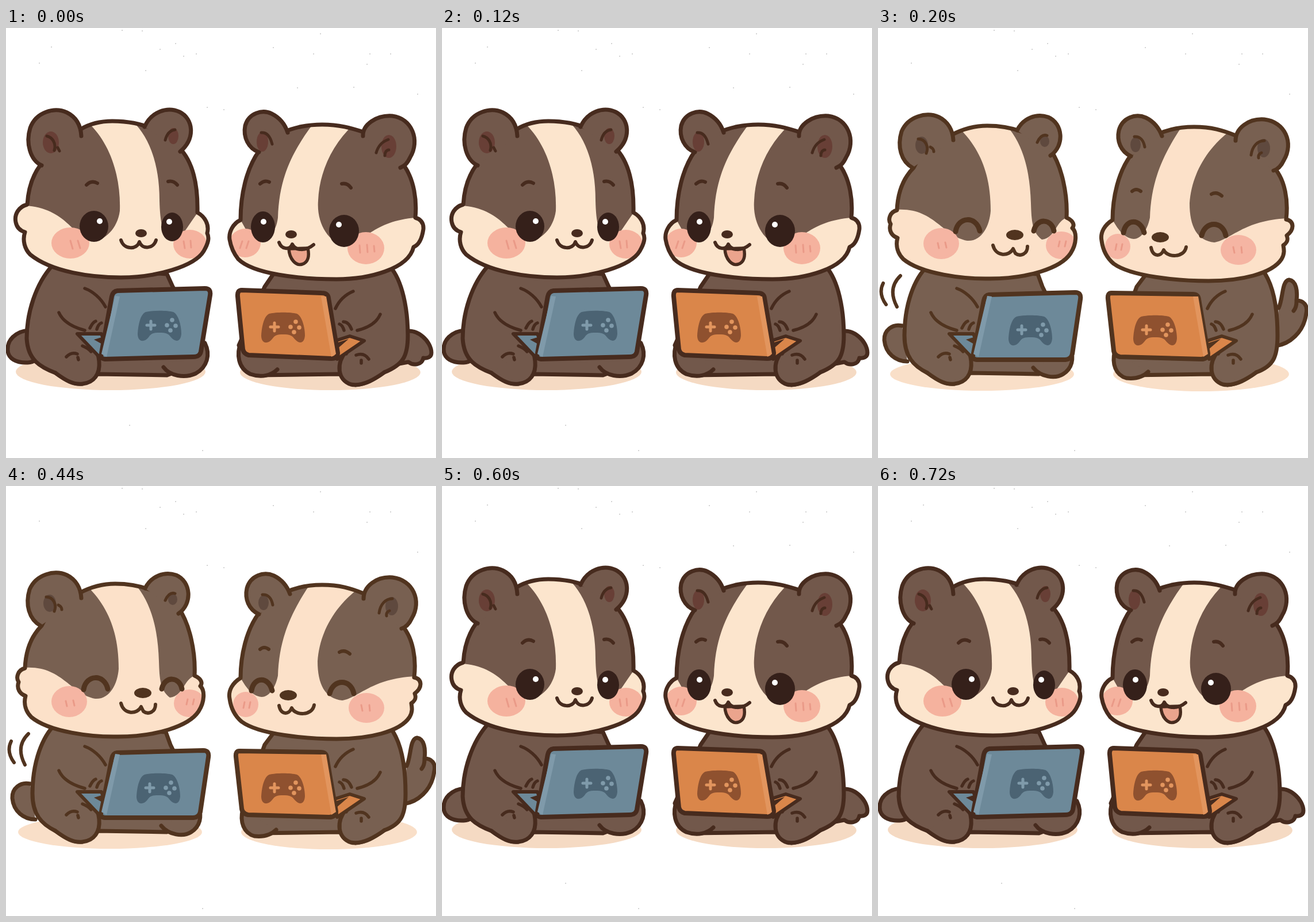
An HTML page for the animation above (800 ms loop, 748x748 px).

```html
<!DOCTYPE html>
<html>
<head>
<meta charset="utf-8">
<style>
html, body { margin: 0; width: 100%; height: 100%; overflow: hidden; background: #fff }
svg { display: block; width: 100vw; height: 100vh; stroke-linecap: round; stroke-linejoin: round }
</style>
</head>
<body>
<svg id="stage" viewBox="0 0 748 748"></svg>
<script>
const path = (d, fill = 'none', stroke = 'none', width = 7) =>
  `<path d="${d}" fill="${fill}" stroke="${stroke}" stroke-width="${width}"/>`;
const oval = ([x, y, rx, ry], fill, extra = '') =>
  `<ellipse cx="${x}" cy="${y}" rx="${rx}" ry="${ry}" fill="${fill}" ${extra}/>`;

const open = { fur: '#72584b', line: '#472b1e', cream: '#fce5cd', blush: '#f5b29e', ear: '#683f36', shade: '#f5dac3' };
const happy = { fur: '#786051', line: '#51341f', cream: '#fce1c9', blush: '#f5b5a3', ear: '#5f493e', shade: '#f9dfc8' };

// Parts each badger keeps in both poses
const left = {
  arm: 'M92 495C99 511 115 520 137 526M137 453C151 458 165 470 173 485M146 522C150 514 153 511 156 510M158 524C160 517 163 514 166 513',
  foot: 'M86 600C105 614 118 621 133 619C153 617 164 602 162 580C161 568 158 560 151 553',
  knee: 'M105 572Q114 563 124 567M125 573l1 4M133 553Q143 557 148 563',
  base: 'M124 532L166 532L173 550L165 575Z', notch: 'M153 542L173 536L169 551Z',
  device: ['#6d8999', '#7f9aaa', '#4b6373'], bevel: 'M190 466L166 567L175 572L198 467Z'
};
const right = {
  arm: 'M651 498C645 512 632 521 611 526M604 458C592 463 580 473 573 488M601 524C597 514 592 511 587 511M588 526C586 519 583 516 580 515',
  foot: 'M592 562C574 583 576 612 600 620C618 624 640 612 658 599',
  knee: 'M609 569Q623 564 631 576M618 578l0 5M600 558Q594 562 592 567',
  base: 'M623 544L598 536L570 545L576 576Z', notch: 'M571 549L596 541L574 560Z',
  device: ['#da864a', '#e2955e', '#8f512f'], bevel: 'M548 467L566 572L574 567L557 467Z'
};

const poseA = [{
  ...left, ...open,
  shadow: [182, 598, 165, 32],
  tail: 'M46 528C28 522 3 537 3 558C2 575 18 583 38 582C44 582 50 579 56 575',
  body: 'M80 414C52 445 36 495 36 540C38 578 60 590 86 600C105 614 118 620 133 619L160 602L280 604L330 585L340 540L290 450L280 428Z',
  foot2: 'M274 590C285 605 310 610 330 601C350 590 356 568 346 548',
  head: 'M60 238C42 262 38 290 37 307C22 311 14 324 17 338C19 348 26 353 33 355C28 370 33 385 42 394C80 425 150 434 200 434C260 434 328 415 344 388C352 374 354 365 350 357C354 342 346 328 333 321C334 275 326 232 300 207C270 175 230 162 185 162C165 162 145 167 130 176C100 188 72 210 60 238Z',
  ears: ['M62 239C42 230 34 200 42 174C52 146 84 137 106 147C122 155 130 168 131 188', 'M241 172C252 146 280 136 302 146C326 158 330 192 303 215'],
  inner: [[78, 199, 14, 19], [291, 188, 9, 14]],
  folds: 'M71 188C80 190 88 200 84 213M90 208l3 6M277 195C280 183 287 178 294 177',
  patches: 'M142 164C182 200 200 260 198 318C194 350 170 372 148 370C118 365 105 313 33 309L20 200L100 140ZM218 160C251 190 267 240 267 300C268 340 273 362 288 370C305 370 315 345 333 322L350 200L270 150Z',
  eyes: [[153, 345, 25, 27], [289, 346, 19, 25]], glints: [[163, 336, 5, 5], [284, 337, 5, 5]],
  brows: 'M140 273Q149 264 159 270M282 267Q291 265 298 273',
  nose: [235, 357, 10, 7],
  mouth: 'M200 369C205 386 228 386 232 372C237 386 257 384 261 369',
  cheeks: [[112, 374, 33, 27], [320, 376, 29, 25]],
  lines: 'M112 370l4 14M125 370l4 13M309 371l2 12M321 370l1 12',
  lid: 'M194 457L346 453Q357 453 355 465L339 563Q337 572 326 572L172 576Q163 575 166 566L184 467Q186 458 194 457Z',
  pad: [0, 0]
}, {
  ...right, ...open,
  shadow: [564, 599, 157, 31],
  tail: 'M694 528C715 522 740 545 740 565C740 573 732 575 726 574C724 586 709 588 700 581L684 584',
  body: 'M668 415C690 440 699 490 699 535C699 572 690 586 658 599C640 612 625 620 608 621L580 602L440 604L405 552L450 450L465 428Z',
  foot2: 'M409 545C400 568 404 592 425 602C445 609 462 604 472 594',
  head: 'M440 214C418 245 408 290 408 334C395 340 387 355 389 368C391 380 396 392 404 402C430 428 510 437 575 437C630 437 700 420 709 381C719 377 724 364 726 350C727 338 720 332 712 330C715 300 710 265 693 240C684 212 655 191 622 181C600 174 580 168 550 168C525 168 500 173 484 181C465 188 448 200 440 214Z',
  ears: ['M440 216C422 210 412 190 416 170C422 148 446 141 462 149C476 156 485 166 490 182', 'M621 188C620 168 645 151 672 153C706 157 721 195 703 225C698 236 693 240 686 243'],
  inner: [[446, 198, 10, 17], [666, 206, 13, 20]],
  folds: 'M444 182C455 181 460 190 463 202M644 217C648 203 656 197 665 194M659 222C659 216 662 212 666 212',
  patches: 'M536 164C494 220 475 265 473 330C470 355 455 372 440 372C425 370 415 345 408 334L390 220L460 150ZM609 164C568 200 545 250 543 300C540 340 560 372 590 380C620 375 640 335 713 330L740 220L660 150Z',
  eyes: [[447, 346, 21, 27], [588, 353, 26, 28]], glints: [[448, 337, 5, 5], [579, 342, 5, 5]],
  brows: 'M442 271Q450 264 458 268M584 271Q594 269 600 278',
  nose: [496, 359, 10, 7],
  mouth: 'M475 373C479 385 494 387 498 376C503 388 522 388 535 377',
  tongue: 'M492 384C493 402 504 414 515 411C526 408 528 396 525 383Z',
  cheeks: [[416, 374, 27, 25], [626, 383, 32, 28]],
  lines: 'M411 371l-4 12M422 371l-4 12M615 378l1 13M628 377l1 13M640 379l1 10',
  lid: 'M410 456L549 461Q560 461 561 470L577 565Q577 575 566 575L422 569Q414 567 412 559L403 467Q402 456 410 456Z',
  pad: [215, 3]
}];

const poseB = [{
  ...left, ...happy,
  shadow: [181, 602, 160, 29],
  tail: 'M42 518C25 514 10 526 11 543C13 566 31 580 51 580',
  swish: 'M9 444Q0 462 14 481M39 431Q16 453 33 485',
  body: 'M82 418C58 445 46 490 46 535C46 572 62 588 86 600C105 614 118 620 133 619L160 600L280 602L322 590L335 550L286 450L278 428Z',
  foot2: 'M270 591C283 607 308 611 322 602C338 592 341 575 335 558',
  head: 'M62 243C40 265 34 292 33 317C20 320 17 334 22 341C18 352 24 362 34 365C30 380 35 393 44 402C75 428 150 437 195 436C260 436 318 418 335 392C346 375 346 355 338 348C344 341 336 333 328 330C330 290 320 240 300 212C270 182 230 170 190 170C165 170 145 177 128 186C100 197 74 217 62 243Z',
  ears: ['M60 243C40 232 33 206 41 180C52 154 84 145 106 155C122 163 130 178 131 195', 'M242 178C252 157 275 148 296 155C322 166 325 205 300 222'],
  inner: [[76, 204, 11, 15], [290, 197, 8, 10]],
  folds: 'M70 193C82 193 89 206 84 218M91 207Q97 210 97 215M277 199C282 188 288 185 294 187',
  patches: 'M132 166C178 205 196 255 196 318C194 345 180 372 155 370C112 362 97 312 33 316L15 200L100 150ZM214 160C249 192 264 240 266 305C267 335 268 355 285 368C310 365 308 335 331 329L350 220L270 155Z',
  smile: 'M135 354C139 328 171 326 177 353M271 353C276 330 302 331 306 353',
  brows: '',
  nose: [238, 360, 15, 9],
  mouth: 'M200 378C205 398 228 398 235 384L239 392C247 398 260 394 260 380',
  cheeks: [[110, 375, 31, 27], [319, 378, 27, 24]],
  lines: 'M104 374l2 9M117 373l2 9M316 371l-2 9M327 371l-2 9',
  lid: 'M193 464L343 460Q354 460 352 472L338 567Q336 576 326 577L172 577Q162 576 166 566L184 474Q186 465 193 464Z',
  pad: [-2, 8]
}, {
  ...right, ...happy,
  shadow: [562, 602, 153, 30],
  tail: 'M697 487C705 470 702 440 715 438C728 440 730 458 728 474C740 474 748 482 745 496C741 530 715 550 692 553M728 476Q728 486 723 492',
  body: 'M668 420C688 445 695 490 695 535C695 572 688 588 658 599C640 612 625 620 608 621L580 602L440 604L410 562L450 450L465 430Z',
  foot2: 'M412 562C406 585 414 604 432 609C450 611 462 606 470 598',
  head: 'M440 221C418 250 408 295 408 334C395 342 386 355 389 370C391 385 398 400 410 410C440 432 520 440 575 440C630 440 685 428 702 402C708 392 706 384 705 378C714 372 713 366 711 361C725 350 724 336 710 333C714 300 708 265 690 244C682 218 655 197 622 187C600 178 580 172 550 172C525 172 505 176 486 185C465 193 448 206 440 221Z',
  ears: ['M440 223C422 215 415 196 419 178C425 156 448 148 466 156C480 163 489 174 494 188', 'M622 196C622 174 645 157 672 159C708 163 724 200 706 230C701 241 695 246 688 248'],
  inner: [[448, 203, 9, 13], [671, 209, 11, 16]],
  folds: 'M446 189C456 188 462 196 464 207M649 221C651 206 660 196 672 196M662 226Q661 219 667 217',
  patches: 'M532 166C492 225 475 270 473 330C468 355 455 367 445 367C425 365 415 345 408 334L390 220L460 155ZM622 172C573 205 545 255 542 305C542 345 555 370 585 373C615 368 635 335 712 331L740 220L660 155Z',
  smile: 'M427 356C431 331 457 331 463 356M563 361C569 335 600 335 605 361',
  brows: 'M442 284Q449 278 457 284M580 289Q589 284 598 292',
  nose: [491, 364, 15, 9],
  mouth: 'M475 382C478 398 492 399 497 386C503 400 533 400 536 381',
  cheeks: [[417, 380, 22, 22], [627, 386, 31, 26]],
  lines: 'M415 376l-2 10M425 376l-2 10M618 381l2 10M632 381l1 10',
  lid: 'M406 461L547 463Q557 463 558 472L574 566Q573 576 562 576L421 572Q411 570 410 561L400 471Q399 461 406 461Z',
  pad: [215, 8]
}];

function face(b) {
  const eyes = b.eyes
    ? b.eyes.map(e => oval(e, '#35201a')).join('') + b.glints.map(e => oval(e, '#fff')).join('')
    : path(b.smile, 'none', b.line, 9);
  return eyes + path(b.brows, 'none', b.line, 6) +
    (b.tongue ? path(b.tongue, '#eba48d', b.line, 5.5) : '') +
    oval(b.nose, b.line) + path(b.mouth, 'none', b.line, 6);
}

function laptop(b) {
  const [main, light, dark] = b.device;
  const dots = [[289, 508], [280, 517], [295, 518], [286, 526]];
  return path(b.base, main, b.line, 6) + path(b.notch, b.line) +
    path(b.lid, main, b.line, 8) + path(b.bevel, light) +
    `<g transform="translate(${b.pad})">` +
    path('M229 532C230 515 234 498 243 494C255 491 280 491 291 494C300 498 305 518 305 532C304 545 296 548 287 538C282 531 278 530 267 530C256 530 253 531 248 538C240 548 229 546 229 532Z', dark) +
    path('M245 517h14M252 510v14', 'none', light, 5) +
    dots.map(([x, y]) => oval([x, y, 3.8, 3.8], light)).join('') + '</g>';
}

function badger(b, id) {
  return oval(b.shadow, b.shade) +
    path(b.tail, b.fur, b.line) + path(b.swish || '', 'none', b.line, 6) +
    path(b.body, b.fur, b.line) + path(b.foot2, b.fur, b.line) +
    `<clipPath id="${id}"><path d="${b.head}"/></clipPath>` +
    path(b.head, b.cream) + `<g clip-path="url(#${id})">` + path(b.patches, b.fur) +
    b.cheeks.map(c => oval(c, b.blush)).join('') + path(b.lines, 'none', '#ea9a88', 3) + '</g>' +
    path(b.head, 'none', b.line) +
    b.ears.map(e => path(e, b.fur, b.line)).join('') +
    b.inner.map(e => oval(e, b.ear)).join('') + path(b.folds, 'none', b.line, 5) +
    face(b) + path(b.foot, b.fur, b.line) + path(b.arm + b.knee, 'none', b.line, 5.5) + laptop(b);
}

const specks = list => path(list.map(([x, y]) => `M${x} ${y}h.1`).join(''), 'none', '#555', 1.2);
const pose = (pair, id) => `<g id="${id}">` + pair.map((b, i) => badger(b, id + 'Clip' + i)).join('');

const stage = document.getElementById('stage');
stage.innerHTML =
  specks([[202, 4], [237, 5], [58, 61], [243, 74], [268, 37], [295, 27], [309, 49], [331, 45], [465, 34],
    [547, 10], [535, 45], [633, 45], [669, 45], [628, 63], [716, 115], [350, 138], [379, 142], [342, 735]]) +
  pose(poseA, 'awake') + specks([[79, 33], [507, 104], [605, 103], [215, 691]]) + '</g>' +
  pose(poseB, 'giggle') + '</g>';

const awake = document.getElementById('awake'), giggle = document.getElementById('giggle');
function draw() {
  const t = performance.now() % 800, laughing = t >= 200 && t < 600;
  awake.style.display = laughing ? 'none' : '';
  giggle.style.display = laughing ? '' : 'none';
  requestAnimationFrame(draw);
}
draw();
</script>
</body>
</html>
```
